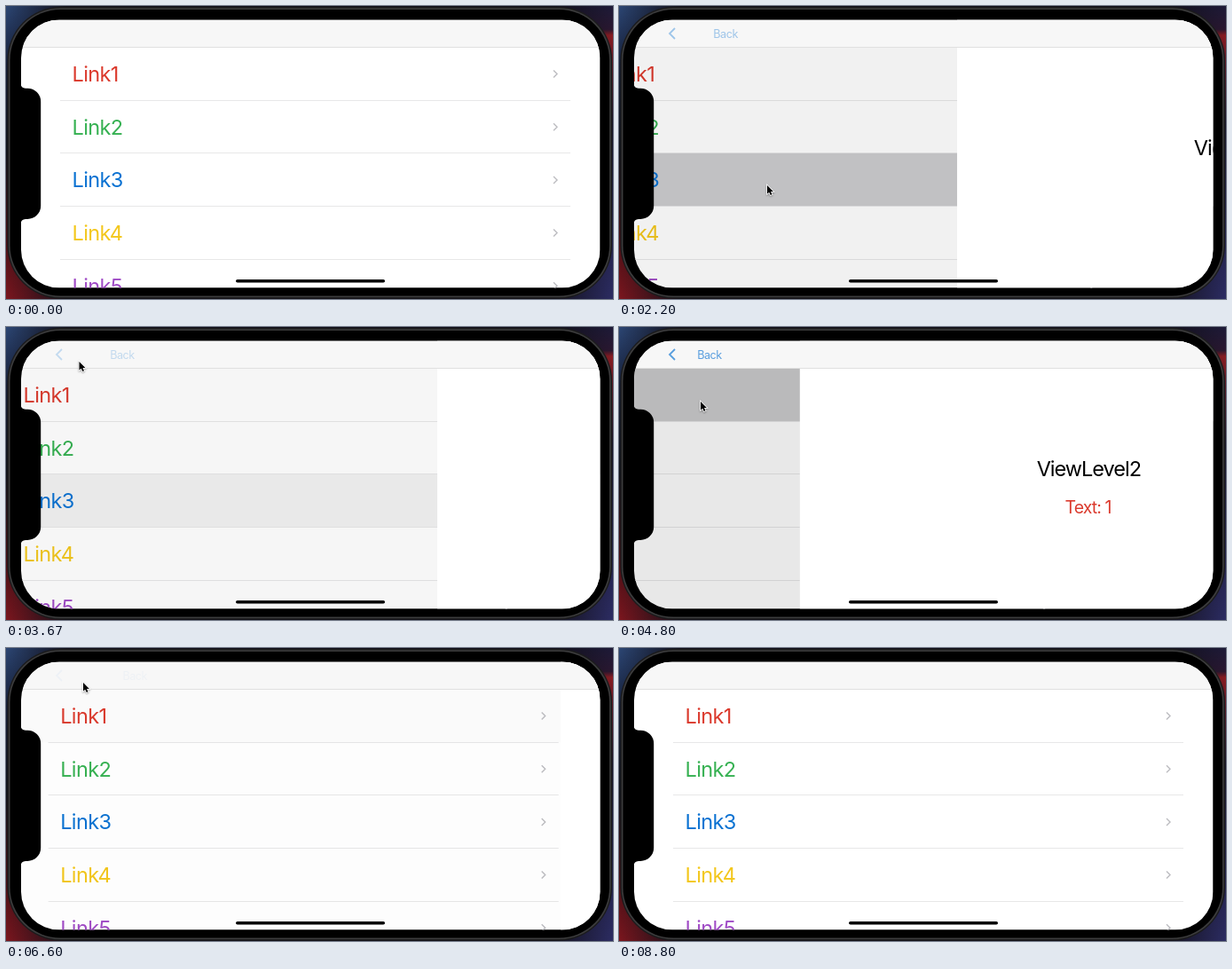
Animation of 684 by 330 pixels, one loop 10000 ms. Source, as an HTML page with a canvas:

```html
<!DOCTYPE html>
<html lang="en">
<head>
<meta charset="utf-8">
<title>Navigation list</title>
<style>
  html, body { margin: 0; width: 100%; height: 100%; overflow: hidden; background: #000; }
  canvas { display: block; }
</style>
</head>
<body>
<canvas id="stage" width="684" height="330"></canvas>
<script>
const ctx = document.getElementById('stage').getContext('2d');
const LOOP = 10000, FPS = 15;
const LEFT = 17, TOP = 15.5, WIDTH = 652.5, HEIGHT = 302, BAR = 46.5, ROW = 59.7;
const BLUE = '#0a72d2';
const COLORS = ['#db3a2d', '#36b152', BLUE, '#f3c71c', '#a04cc6'];

// Navigation: start time, whether it opens the detail view, selected row
const MOVES = [
  { at: 2100, open: true, row: 2 },
  { at: 3498, open: false, row: 2 },
  { at: 4633, open: true, row: 0 },
  { at: 6309, open: false, row: 0 }
];

// Pointer path: time, x, y
const PATH = [
  [0, 592, -14], [400, 430, 110], [800, 235, 222], [1110, 179, 213],
  [1470, 167, 202], [2640, 167, 202], [3130, 103, 32], [3330, 82.5, 39],
  [3670, 82.5, 39], [4330, 92, 84], [5100, 92, 84], [5670, 86, 46],
  [6100, 87, 39], [6640, 87, 39], [7600, 190, 150]
];
const POINTER_END = 8800;

const arrow = new Path2D('M0 0V9.6L2.2 7.7L3.8 11L5.5 10.3L4 6.9H6.9Z');

function box(x, y, w, h, r, fill) {
  ctx.beginPath();
  ctx.roundRect(x, y, w, h, r);
  ctx.fillStyle = fill;
  ctx.fill();
}

function rect(x, y, w, h, fill) {
  ctx.fillStyle = fill;
  ctx.fillRect(x, y, w, h);
}

function text(label, x, y, size, spacing, color, align = 'left') {
  ctx.font = `${size}px Inter, "Liberation Sans", sans-serif`;
  ctx.letterSpacing = spacing + 'px';
  ctx.textAlign = align;
  ctx.fillStyle = color;
  ctx.fillText(label, x, y);
}

function chevron(x, y, dx, dy, width, color) {
  ctx.beginPath();
  ctx.moveTo(x - dx, y - dy);
  ctx.lineTo(x, y);
  ctx.lineTo(x - dx, y + dy);
  ctx.lineWidth = width;
  ctx.strokeStyle = color;
  ctx.stroke();
}

function gradient(x, y, x2, y2, ...stops) {
  const g = ctx.createLinearGradient(x, y, x2, y2);
  stops.forEach(([at, color]) => g.addColorStop(at, color));
  return g;
}

function navigation(t) {
  const move = MOVES.findLast(m => m.at <= t);
  if (!move) return { shown: 0, row: 0, select: 0 };
  const a = (t - move.at) * 0.015;
  const rest = (1 + a) * Math.exp(-a);
  return move.open
    ? { shown: 1 - rest, row: move.row, select: 1 }
    : { shown: rest, row: move.row, select: rest };
}

function drawWallpaper() {
  rect(0, 0, 342, 330, gradient(0, 0, 0, 330,
    [0, '#2c4674'], [0.2, '#16203a'], [0.5, '#10131c'], [0.8, '#4a1016'], [1, '#7c161e']));
  rect(342, 0, 342, 330, gradient(0, 0, 0, 330,
    [0, '#1d1a38'], [0.08, '#2a1730'], [0.1, '#8a1c22'], [0.2, '#5a1a28'], [0.4, '#17152a'], [1, '#2c2c62']));
  rect(0, 0, 684, 330, gradient(0, 0, 684, 0,
    [0, '#12101a00'], [0.1, '#12101a'], [0.9, '#12101a'], [1, '#12101a00']));
}

function drawList({ shown, row, select }) {
  rect(LEFT, TOP, WIDTH, HEIGHT, '#fff');
  if (select > 0.002) {
    ctx.globalAlpha = select;
    rect(LEFT, BAR + row * ROW, WIDTH, ROW, '#ccccce');
    ctx.globalAlpha = 1;
  }
  const shift = -0.3 * WIDTH * shown;
  COLORS.forEach((color, i) => {
    const y = BAR + i * ROW;
    text('Link' + (i + 1), 74.5 + shift, y + 38.5, 23.5, -0.6, color);
    chevron(621 + shift, y + 30, 4, 4, 1.4, '#bcbcc0');
    rect(61 + shift, Math.round(y + ROW - 0.7), 575, 1, '#e7e7e8');
  });
  rect(LEFT, TOP, WIDTH, HEIGHT, `rgba(0,0,0,${0.125 * shown})`);
}

function drawDetail({ shown, row }) {
  const x = LEFT + WIDTH * (1 - shown), middle = x + WIDTH / 2;
  rect(x, TOP, WIDTH, HEIGHT, '#fff');
  text('ViewLevel2', middle - 0.7, 168, 23.5, -1, '#000', 'center');
  text('Text: ' + (row + 1), middle - 1.5, 210, 19.5, -0.9, COLORS[row], 'center');
}

function drawBar({ shown }) {
  rect(LEFT, TOP, WIDTH, 31, '#f7f7f7');
  rect(LEFT, 46, WIDTH, 1, '#e0e0e0');
  ctx.globalAlpha = shown ** 1.2;
  chevron(57, 31, -6, 6, 1.8, BLUE);
  text('Back', 69 + 67 * (1 - shown), 35.5, 12.6, -0.5, BLUE);
  ctx.globalAlpha = 1;
}

function drawNotch() {
  ctx.beginPath();
  ctx.moveTo(16, 87);
  ctx.quadraticCurveTo(17, 92.7, 22, 92.7);
  ctx.arcTo(39.2, 92.7, 39.2, 110, 15);
  ctx.arcTo(39.2, 240, 22, 240, 15);
  ctx.lineTo(22, 240);
  ctx.quadraticCurveTo(17, 240, 16, 246);
  ctx.fillStyle = '#000';
  ctx.fill();
}

function drawPointer(t) {
  if (t < 60 || t >= POINTER_END - 5) return;
  const next = PATH.findIndex(p => p[0] > t);
  let [, x, y] = PATH[PATH.length - 1];
  if (next > 0) {
    const [t0, x0, y0] = PATH[next - 1], [t1, x1, y1] = PATH[next];
    const u = (t - t0) / (t1 - t0), e = u * u * (3 - 2 * u);
    x = x0 + (x1 - x0) * e;
    y = y0 + (y1 - y0) * e;
  }
  ctx.save();
  ctx.translate(x, y);
  ctx.shadowColor = 'rgba(0,0,0,.35)';
  ctx.shadowBlur = 2;
  ctx.shadowOffsetY = 1;
  ctx.lineWidth = 1.6;
  ctx.strokeStyle = '#fff';
  ctx.stroke(arrow);
  ctx.shadowColor = 'transparent';
  ctx.fillStyle = '#000';
  ctx.fill(arrow);
  ctx.restore();
}

function draw(t) {
  const state = navigation(t);
  drawWallpaper();
  box(1.5, 1, 681.5, 328.5, 60, '#1b1b1c');
  box(3, 2.5, 678.5, 325.5, 58, '#3c3c3d');
  box(4.5, 4, 675.5, 322.5, 57, '#000');
  ctx.save();
  ctx.beginPath();
  ctx.roundRect(LEFT, TOP, WIDTH, HEIGHT, 43);
  ctx.clip();
  drawList(state);
  if (state.shown > 0.001) drawDetail(state);
  drawBar(state);
  box(259, 308, 168, 3.6, 1.8, '#000');
  ctx.restore();
  drawNotch();
  drawPointer(t);
}

function tick() {
  const t = performance.now() % LOOP;
  const step = Math.floor((t + 4) * FPS / 1000);
  draw(step * 1000 / FPS);
  requestAnimationFrame(tick);
}
tick();
</script>
</body>
</html>
```
